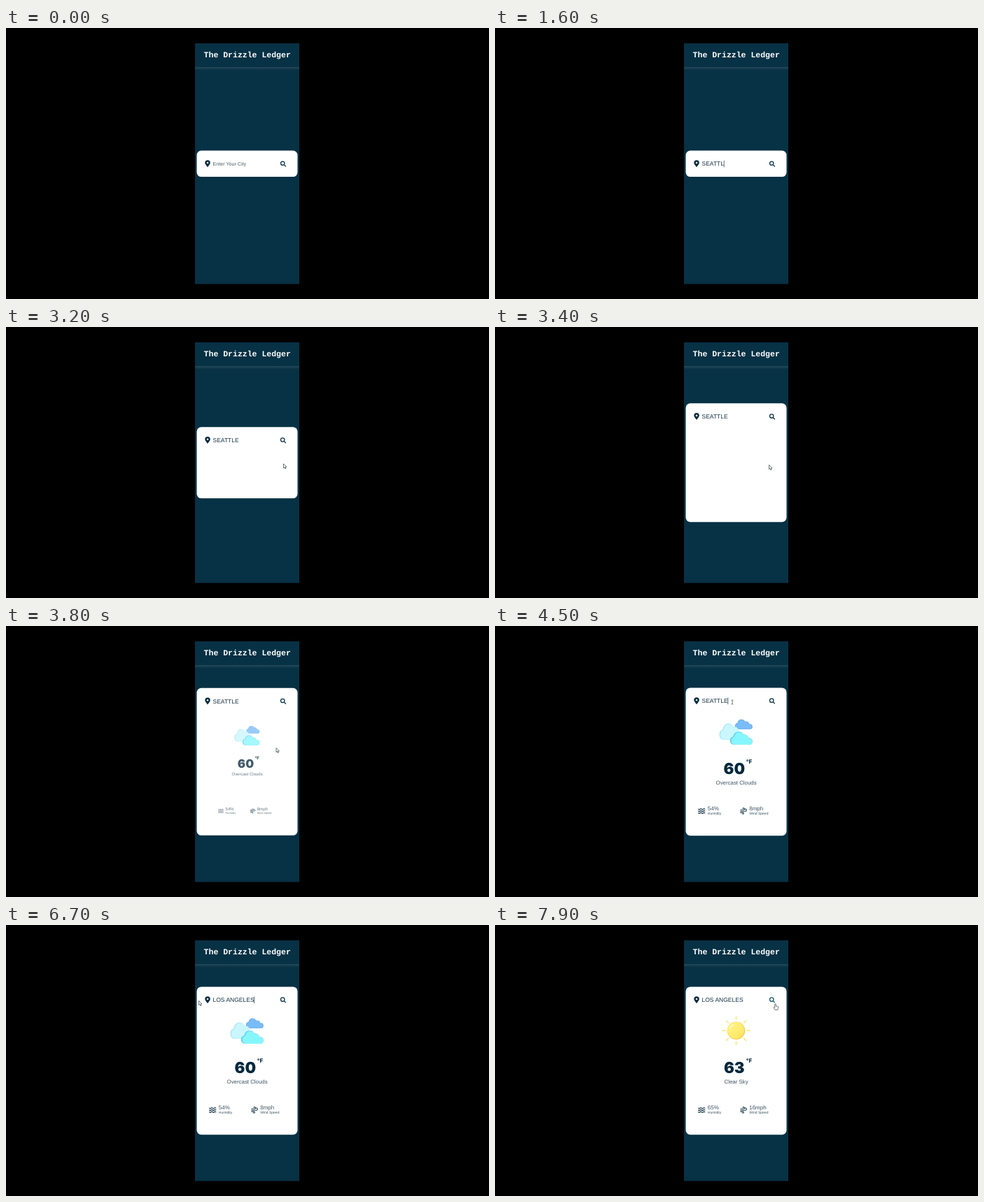
An HTML page for the animation above (8000 ms loop, 690 px wide and 388 px high).

```html
<!DOCTYPE html>
<html lang="en">
<head>
<meta charset="utf-8">
<title>The Drizzle Ledger</title>
<style>
  html, body { margin: 0; width: 100%; height: 100%; overflow: hidden; background: #000; }
  svg { display: block; width: 690px; height: 388px; }
  text { font-family: Arial, "Liberation Sans", sans-serif; fill: #3d5463; white-space: pre;
         text-rendering: geometricPrecision; }
  .title { font: bold 11.5px "Liberation Mono", "Courier New", monospace; fill: #fff; }
  .hint { font-size: 7.15px; fill: #4b5d66; }
  .city { font-size: 8.5px; fill: #173243; }
  .temp { font: 900 22px Inter, "Liberation Sans", sans-serif; fill: #06283d; }
  .unit { font: 800 8px Inter, "Liberation Sans", sans-serif; fill: #06283d; }
  .sky { font-size: 7.85px; }
  .value { font-size: 8px; }
  .label { font-size: 5px; }
  .line { fill: none; stroke: #213f50; stroke-width: 1.15; stroke-linecap: round; stroke-linejoin: round; }
  .pointer { fill: #fff; stroke: #333b40; stroke-width: .7; stroke-linejoin: round; }
</style>
</head>
<body>
<svg viewBox="0 0 690 388">
  <defs>
    <linearGradient id="glow" x2="0" y2="1">
      <stop stop-color="#3c5d6d" stop-opacity=".6"/>
      <stop offset=".35" stop-color="#2a4c5d" stop-opacity=".45"/>
      <stop offset="1" stop-color="#073144" stop-opacity="0"/>
    </linearGradient>
    <linearGradient id="sunFill" x2="1" y2="1">
      <stop offset=".3" stop-color="#fff07c"/>
      <stop offset="1" stop-color="#ffe45c"/>
    </linearGradient>
    <path id="puff" d="M6 20 A6 6 0 0 1 5.4 8.2 A7.6 7.6 0 0 1 19.6 5.4 A6 6 0 0 1 27 10.4 A4.9 4.9 0 0 1 29 20 Z"/>
    <clipPath id="clip"><rect id="clipBox" x="272.5" width="144" rx="6.5"/></clipPath>
  </defs>

  <rect width="690" height="388"/>
  <rect x="270" y="22" width="149" height="344.5" fill="#073144"/>
  <rect x="270" y="56" width="149" height="6" fill="url(#glow)"/>
  <text class="title" x="282.6" y="42">The Drizzle Ledger</text>

  <rect id="card" x="272.5" width="144" rx="6.5" fill="#fff"/>

  <g id="row">
    <path fill="#0a2c40" fill-rule="evenodd"
      d="M288 4.8 C286.6 2.8 284.2 .4 284.2 -1.4 A3.8 3.8 0 0 1 291.8 -1.4 C291.8 .4 289.4 2.8 288 4.8 Z
         M288 -2.7 A1.3 1.3 0 0 0 288 -.1 A1.3 1.3 0 0 0 288 -2.7 Z"/>
    <text class="hint" id="hint" x="295.5" y="2.7">Enter Your City</text>
    <rect id="mark" y="-5" height="10" fill="#0078d7"/>
    <text class="city" x="295.5" y="3"><tspan id="plain"></tspan><tspan id="picked" fill="#fff"></tspan></text>
    <rect id="caret" y="-4.8" width=".7" height="9.6" fill="#173243"/>
    <g id="lens" fill="none" stroke-width="1.3" stroke-linecap="round">
      <circle cx="395.2" cy="-.7" r="2.7"/>
      <path d="M397.3 1.4 L399.4 3.5"/>
    </g>
  </g>

  <g clip-path="url(#clip)">
    <g id="weather">
      <g id="clouds">
        <use href="#puff" transform="translate(342.4 132.6) scale(.77 .76)" fill="#5aa4ea"/>
        <use href="#puff" transform="translate(343.2 133.4) scale(.72 .7)" fill="#78bcf8"/>
        <use href="#puff" transform="translate(319.8 137.6) scale(1.06 1.27)" fill="#a5e6f4"/>
        <use href="#puff" transform="translate(321.2 138.4) scale(1.02 1.22)" fill="#c9f7fd"/>
        <use href="#puff" transform="translate(335 150)" fill="#62cdee"/>
        <use href="#puff" transform="translate(336.8 150.8) scale(.94 .96)" fill="#86f6fd"/>
      </g>
      <g id="sun">
        <g id="rays" stroke="#ffe673" stroke-width="1.5" stroke-linecap="round"></g>
        <circle cx="344.5" cy="151.3" r="12.8" fill="#f7cf4f"/>
        <circle cx="344" cy="150.8" r="12" fill="url(#sunFill)"/>
        <path d="M335.8 148.5 A9 9 0 0 1 341 142.6" fill="none" stroke="#fffbd0" stroke-width="1.4" stroke-linecap="round"/>
      </g>
      <text class="temp" id="temp" x="341.8" y="212.3" text-anchor="middle"></text>
      <text class="unit" x="358.8" y="197">°F</text>
      <text class="sky" id="sky" x="344.6" y="227" text-anchor="middle"></text>
    </g>
    <g id="details">
      <g class="line" id="waves"></g>
      <text class="value" id="damp" x="303.8" y="263.6"></text>
      <text class="label" x="303.8" y="270">Humidity</text>
      <path class="line" d="M350.8 263.2 H355 A1.3 1.3 0 1 0 353.9 261.2 M350.8 265.2 H357.8 A1.6 1.6 0 1 0 356.5 262.6
        M350.8 267.1 H354.3 A1.1 1.1 0 1 1 353.3 268.8"/>
      <text class="value" id="wind" x="363.2" y="263.6"></text>
      <text class="label" x="363.2" y="270">Wind Speed</text>
    </g>
  </g>

  <g id="cursor">
    <path class="pointer" id="arrow" d="M0 0 V6.2 L1.4 5 L2.4 7.2 L3.5 6.7 L2.5 4.6 H4.4 Z"/>
    <path class="pointer" id="hand" d="M-.8 .6 Q-.8 -.2 0 -.2 Q.8 -.2 .8 .6 V3 L3.4 3.6 Q4.3 3.9 4.2 4.8 L3.7 7.2 L3.1 8.6 H-.4
      L-2.4 5.5 Q-2.7 4.6 -1.9 4.5 L-.8 5.3 Z"/>
    <path id="beam" fill="none" stroke="#333b40" stroke-width=".7" d="M-1.5 -3 Q0 -3 0 -2.3 Q0 -3 1.5 -3 M0 -2.3 V2.3 M-1.5 3 Q0 3 0 2.3 Q0 3 1.5 3"/>
  </g>
</svg>

<script>
const LOOP = 8000, STEP = 100;
const $ = id => document.getElementById(id);
const show = (id, on) => $(id).setAttribute("display", on ? "inline" : "none");
const set = (id, attrs) => { for (const k in attrs) $(id).setAttribute(k, attrs[k]); };
const clamp = v => Math.min(1, Math.max(0, v));
const within = (t, a, b) => t >= a && t < b;
const lastOf = (table, t) => table.filter(row => row[0] <= t).pop();

const typed = [
  [0, ""], [900, "S"], [1200, "SEAT"], [1500, "SEATT"], [1600, "SEATTL"], [1700, "SEATTLE"],
  [5200, "LOS "], [6500, "LOS AN"], [6600, "LOS ANGE"], [6700, "LOS ANGELES"]
];
const reports = [
  [0, "60", "Overcast Clouds", "54%", "8mph"],
  [7900, "63", "Clear Sky", "65%", "16mph"]
];
const path = [
  [2300, 385, 28], [2500, 397, 90], [2800, 401, 188], [2900, 401, 192], [3000, 401, 192],
  [3100, 399, 195], [3400, 391.5, 197.5], [3800, 386, 174.5], [4000, 380, 160], [4400, 339, 109],
  [4500, 339, 109], [4800, 275.5, 108.5], [7000, 275.5, 108.5], [7100, 286, 105],
  [7200, 275.5, 108.5], [7400, 275.5, 108.5], [7700, 398, 113], [7900, 400.5, 113]
];

// CSS "ease": cubic-bezier(.25, .1, .25, 1)
function ease(p) {
  const bez = (u, a, b) => 3 * u * (1 - u) ** 2 * a + 3 * u * u * (1 - u) * b + u ** 3;
  let lo = 0, hi = 1;
  for (let i = 0; i < 24; i++) {
    const mid = (lo + hi) / 2;
    if (bez(mid, .25, .25) < p) lo = mid; else hi = mid;
  }
  return bez(lo, .1, 1);
}
const progress = (t, start, length) => ease(clamp((t - start) / length));

function place(t) {
  const i = path.findIndex(k => k[0] > t);
  if (i < 0) return path[path.length - 1].slice(1);
  if (i === 0) return path[0].slice(1);
  const [a, b] = [path[i - 1], path[i]];
  const p = (t - a[0]) / (b[0] - a[0]);
  return [a[1] + (b[1] - a[1]) * p, a[2] + (b[2] - a[2]) * p];
}

function zoom(id, cy, p) {
  set(id, { transform: `translate(344.5 ${cy}) scale(${p}) translate(-344.5 ${-cy})`, opacity: p });
}

function drawField(t, mouseX) {
  const text = lastOf(typed, t)[1];
  const width = n => n ? $("plain").getSubStringLength(0, n) : 0;
  $("picked").textContent = "";
  $("plain").textContent = text;
  const full = width(text.length);
  let cut = text.length;
  const selecting = within(t, 4600, 5200);
  if (selecting) while (cut > 0 && 295.5 + width(cut) > mouseX + 2) cut--;
  const left = width(cut);
  $("plain").textContent = text.slice(0, cut);
  $("picked").textContent = text.slice(cut);
  set("mark", { x: 295.5 + left, width: full - left });
  show("mark", selecting);
  set("caret", { x: 295.3 + full });
  show("caret", within(t, 900, 2900) || within(t, 4400, 4600) || within(t, 5200, 7800));
  show("hint", !text);
}

function render(t) {
  const grow = progress(t, 2995, 880);
  const height = 37.5 + 174.2 * grow, top = 194.3 - height / 2;
  set("card", { y: top, height });
  set("clipBox", { y: top, height });
  set("row", { transform: `translate(0 ${top + 18.9})` });

  const [x, y] = place(t);
  const overLens = within(t, 2800, 3200) || t >= 7700;
  const overText = within(t, 4300, 4800) || within(t, 7500, 7700);
  set("cursor", { transform: `translate(${x} ${y})` });
  show("cursor", t >= 2300);
  show("hand", overLens);
  show("beam", overText);
  show("arrow", !overLens && !overText);
  set("lens", { stroke: overLens ? "#12586c" : "#0d3448" });
  drawField(t, x);

  const appear = progress(t, 3500, 650);
  zoom("weather", 173, appear);
  zoom("details", 264.5, appear);
  const [start, temp, sky, damp, wind] = lastOf(reports, t);
  Object.entries({ temp, sky, damp, wind }).forEach(([id, s]) => $(id).textContent = s);
  show("sun", start > 0);
  show("clouds", start === 0);
}

$("rays").innerHTML = Array.from({ length: 8 }, (_, i) =>
  `<path d="M344.5 135.6 V131.2" transform="rotate(${i * 45} 344.5 151.3)"/>`).join("");
$("waves").innerHTML = [262.2, 265, 267.8].map(y =>
  `<path d="M290.6 ${y} q1.15 1.3 2.3 0 t2.3 0 t2.3 0 t2.3 0"/>`).join("");

const began = performance.now();
function tick() {
  const t = (performance.now() - began) % LOOP;
  render(Math.floor(t / STEP) * STEP);
  requestAnimationFrame(tick);
}
tick();
</script>
</body>
</html>
```
